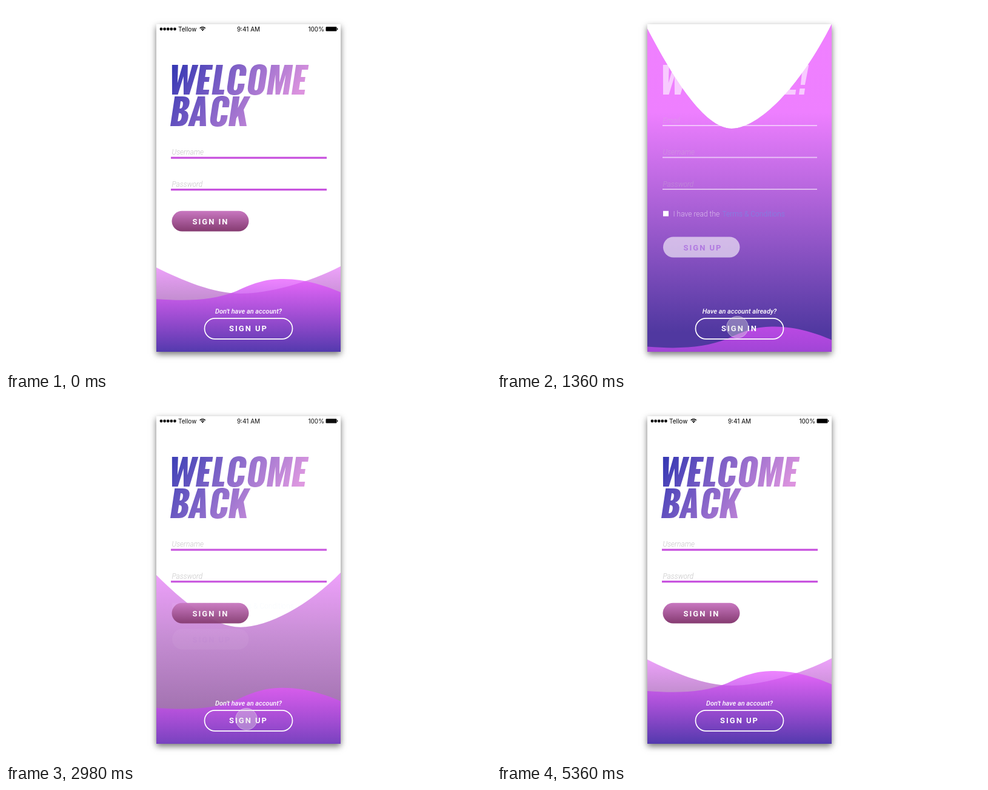
These frames come from a looping animation (800 px wide and 600 px high, 5.38 s). An HTML page with a canvas:

```html
<!DOCTYPE html>
<html lang="en">
<head>
<meta charset="utf-8">
<title>Sign in and sign up</title>
<style>
html, body { margin: 0; width: 100%; height: 100%; overflow: hidden; background: #fff; }
canvas { display: block; width: 800px; height: 600px; }
</style>
</head>
<body>
<canvas id="stage" width="800" height="600" role="img" aria-label="Welcome back: sign in and sign up screens"></canvas>
<script>
const ctx = document.getElementById('stage').getContext('2d');
const LOOP = 5380;
const X = 248, Y = 30, W = 304, H = 540;
const BODY = 'Roboto, Arial, sans-serif';
const BOLD = '700 13px ' + BODY;
const FIELD = 'italic 300 12px ' + BODY;

// Condensed display capitals, 49 units tall
const GLYPHS = {
  W: 'M0 0H10L13.5 30L17.5 0H26L30 30L33.5 0H43.5L36 49H26.5L21.8 19L17 49H7.5Z',
  E: 'M0 0H21V8H11V20H18.5V28H11V41H21V49H0Z',
  L: 'M0 0H11V41H19.5V49H0Z',
  C: 'M28 31V36Q28 50 14 50Q0 50 0 35V14Q0 -1 14 -1Q28 -1 28 13V18H17V12Q17 7 14 7Q11 7 11 12V37Q11 42 14 42Q17 42 17 37V31Z',
  O: 'M14 -1Q28 -1 28 14V35Q28 50 14 50Q0 50 0 35V14Q0 -1 14 -1ZM14 7Q11 7 11 12V37Q11 42 14 42Q17 42 17 37V12Q17 7 14 7Z',
  M: 'M0 0H14L18 29L22 0H36V49H26.5V16L21.5 49H14.5L9.5 16V49H0Z',
  B: 'M0 0H13Q26 0 26 12Q26 21 19 23Q27.5 25 27.5 35Q27.5 49 14 49H0ZM11 8V20H12Q15.5 20 15.5 14Q15.5 8 12 8ZM11 27.5V41H12Q16.5 41 16.5 34Q16.5 27.5 12 27.5Z',
  A: 'M9 0H21L30 49H19.5L18.2 40H11.8L10.5 49H0ZM12.7 32.5H17.3L15 14Z',
  K: 'M0 0H11V19L18.5 0H29L21 22L30 49H18.5L13 32L11 36V49H0Z',
  '!': 'M0 0H10L8.5 33H1.5ZM1 39H9.5V49H1Z'
};
const WELCOME_X = [266.5, 313, 339.5, 363, 397, 430, 471, 497];
const BACK_X = [271, 300, 335, 367];

const clamp = v => Math.max(0, Math.min(1, v));
const ramp = (t, start, length) => clamp((t - start) / length);

function ease(p) {
  if (p <= 0 || p >= 1) return clamp(p);
  const bez = (a, b, u) => 3 * a * u * (1 - u) ** 2 + 3 * b * u * u * (1 - u) + u ** 3;
  let lo = 0, hi = 1;
  for (let i = 0; i < 24; i++) {
    const mid = (lo + hi) / 2;
    if (bez(0.25, 0.25, mid) < p) lo = mid; else hi = mid;
  }
  return bez(0.1, 1, lo);
}

function gradient(x0, y0, x1, y1, stops) {
  const g = ctx.createLinearGradient(x0, y0, x1, y1);
  stops.forEach(([at, color]) => g.addColorStop(at, color));
  return g;
}

function text(str, x, y, font, color, spacing = 0, align = 'left') {
  ctx.font = font;
  ctx.letterSpacing = spacing + 'px';
  ctx.textAlign = align;
  ctx.fillStyle = color;
  ctx.fillText(str, x, y);
}

function pill(x, y, w, h) {
  ctx.beginPath();
  ctx.roundRect(x, y, w, h, h / 2);
}

function withAlpha(a, draw) {
  if (a <= 0) return;
  ctx.save();
  ctx.globalAlpha = a;
  draw();
  ctx.restore();
}

function lettering(word, xs, top, fill) {
  const line = new Path2D();
  const slant = 0.15;
  [...word].forEach((ch, i) => {
    line.addPath(new Path2D(GLYPHS[ch]), new DOMMatrix([1, 0, -slant, 1, xs[i] + slant * 49, top]));
  });
  ctx.fillStyle = fill;
  ctx.fill(line, 'evenodd');
}

function statusBar(color) {
  const font = '400 10px Inter, Arial, sans-serif';
  ctx.fillStyle = color;
  for (let i = 0; i < 5; i++) {
    ctx.beginPath();
    ctx.arc(256 + i * 5.6, 38, 2.4, 0, 7);
    ctx.fill();
  }
  text('Tellow', 284, 42, font, color);
  text('9:41 AM', 400, 42, font, color, 0, 'center');
  text('100%', 525, 42, font, color, 0, 'right');
  ctx.strokeStyle = color;
  ctx.lineWidth = 1.4;
  for (const r of [3.6, 6.3]) {
    ctx.beginPath();
    ctx.arc(324.3, 41, r, -Math.PI * 0.76, -Math.PI * 0.24);
    ctx.stroke();
  }
  ctx.beginPath();
  ctx.moveTo(324.3, 41.2);
  ctx.arc(324.3, 41.2, 2.2, -Math.PI * 0.76, -Math.PI * 0.24);
  ctx.fill();
  ctx.beginPath();
  ctx.roundRect(527.5, 34.2, 18, 7.4, 1.4);
  ctx.fill();
  ctx.fillRect(546, 36.5, 1.3, 2.8);
}

function backWave(w, solid) {
  const low = 474 - 457 * w;
  const k = (43 + 204 * w) / 43;
  const y = v => low + (v - 474) * k;
  ctx.beginPath();
  ctx.moveTo(X, y(431));
  ctx.bezierCurveTo(290, y(452), 342, low, 387, low);
  ctx.bezierCurveTo(432, low, 500, y(456), X + W, y(429));
  ctx.lineTo(X + W, Y + H);
  ctx.lineTo(X, Y + H);
  ctx.closePath();
  ctx.fillStyle = gradient(0, y(429), 0, 570, [[0, '#eea2fb'], [0.37, '#c68fd3'], [0.8, '#a575b0'], [1, '#9a6ea6']]);
  ctx.fill();
  withAlpha(solid, () => {
    ctx.fillStyle = gradient(0, y(429), 0, 570, [[0, '#f080ff'], [0.27, '#ee7fff'], [0.94, '#5038a0'], [1, '#5038a0']]);
    ctx.fill();
  });
}

function frontWave(w) {
  ctx.save();
  ctx.translate(0, 132 * w);
  ctx.beginPath();
  ctx.moveTo(X, 483);
  ctx.bezierCurveTo(300, 487, 342, 485, 380, 470);
  ctx.bezierCurveTo(412, 455, 430, 450, 458, 450);
  ctx.bezierCurveTo(494, 450, 530, 462, X + W, 472);
  ctx.lineTo(X + W, 580);
  ctx.lineTo(X, 580);
  ctx.closePath();
  ctx.fillStyle = gradient(0, 450, 0, 572, [[0, 'rgba(230,80,255,.7)'], [1, '#5039ac']]);
  ctx.fill();
  ctx.restore();
}

function signInForm() {
  statusBar('#000');
  const fill = gradient(274, 97, 440, 210, [[0, '#3437b3'], [1, '#dd94df']]);
  lettering('WELCOME', WELCOME_X, 97, fill);
  lettering('BACK', BACK_X, 149, fill);
  [['Username', 245], ['Password', 297.5]].forEach(([label, y]) => {
    text(label, 273.5, y, FIELD, '#c4c4c4');
    ctx.fillStyle = '#c750de';
    ctx.fillRect(272, y + 3.6, 257, 3.2);
  });
  pill(273.5, 337.7, 127, 33.8);
  ctx.fillStyle = gradient(0, 338, 0, 371, [[0, '#c877c0'], [1, '#863c72']]);
  ctx.fill();
  text('SIGN IN', 307.5, 359.5, BOLD, '#fff', 2);
}

function signUpForm() {
  statusBar('#fff');
  lettering('WELCOME!', WELCOME_X, 97, '#fff');
  [['Email', 192.5], ['Username', 245], ['Password', 297.5]].forEach(([label, y]) => {
    text(label, 273.5, y, FIELD, 'rgba(200,200,200,.65)');
    ctx.fillStyle = '#fff';
    ctx.fillRect(273, y + 3.7, 255, 1.8);
  });
  const font = '300 12px ' + BODY;
  text('I have read the', 290.5, 346.5, font, '#fff');
  text('Terms & Conditions', 371.5, 346.5, font, '#62a0f2');
  pill(274, 380.5, 126.5, 34);
  ctx.fillStyle = '#fff';
  ctx.fill();
  text('SIGN UP', 307.5, 402.5, BOLD, '#9b4bdc', 2);
}

function footer(question, action, x) {
  text(question, 400, 507, 'italic 500 11px ' + BODY, '#fff', 0, 'center');
  text(action, x, 535.7, BOLD, '#fff', 2);
}

function touch(t) {
  const x = 572 - 175.5 * (ease(ramp(t, 60, 620)) - ease(ramp(t, 4360, 480)));
  if (x > 571) return;
  ctx.beginPath();
  ctx.arc(x, 529.3, 17.8, 0, 7);
  ctx.fillStyle = 'rgba(222,222,222,.38)';
  ctx.fill();
  ctx.strokeStyle = 'rgba(255,255,255,.4)';
  ctx.lineWidth = 1;
  ctx.stroke();
}

function render(t) {
  const goUp = 1175, goBack = 2718;
  const returning = t >= goBack;
  const wave = ease(ramp(t, goUp, 540)) - ease(ramp(t, goBack, 540));
  const quick = ramp(t, goUp, 90);
  const restored = ease(ramp(t, goBack, 360));
  const solid = quick - restored;
  const upAlpha = returning ? 1 - restored : wave;
  const footSwap = quick - ramp(t, goBack, 90);

  ctx.fillStyle = '#fff';
  ctx.fillRect(0, 0, 800, 600);
  ctx.save();
  ctx.shadowColor = 'rgba(0,0,0,.55)';
  ctx.shadowBlur = 10;
  ctx.shadowOffsetY = 4;
  ctx.fillRect(X, Y, W, H);
  ctx.restore();

  ctx.save();
  ctx.beginPath();
  ctx.rect(X, Y, W, H);
  ctx.clip();
  backWave(wave, solid);
  frontWave(wave);
  withAlpha(upAlpha, signUpForm);
  withAlpha(solid, () => {
    ctx.fillStyle = '#fff';
    ctx.fillRect(274, 337.8, 9, 8.8);
  });
  withAlpha(1 - solid, signInForm);
  withAlpha(1 - footSwap, () => footer("Don't have an account?", 'SIGN UP', 368));
  withAlpha(footSwap, () => footer('Have an account already?', 'SIGN IN', 370));
  pill(327.5, 514.8, 145, 34);
  ctx.strokeStyle = '#fff';
  ctx.lineWidth = 1.7;
  ctx.stroke();
  touch(t);
  ctx.restore();
}

function tick() {
  render(performance.now() % LOOP);
  requestAnimationFrame(tick);
}
tick();
</script>
</body>
</html>
```
